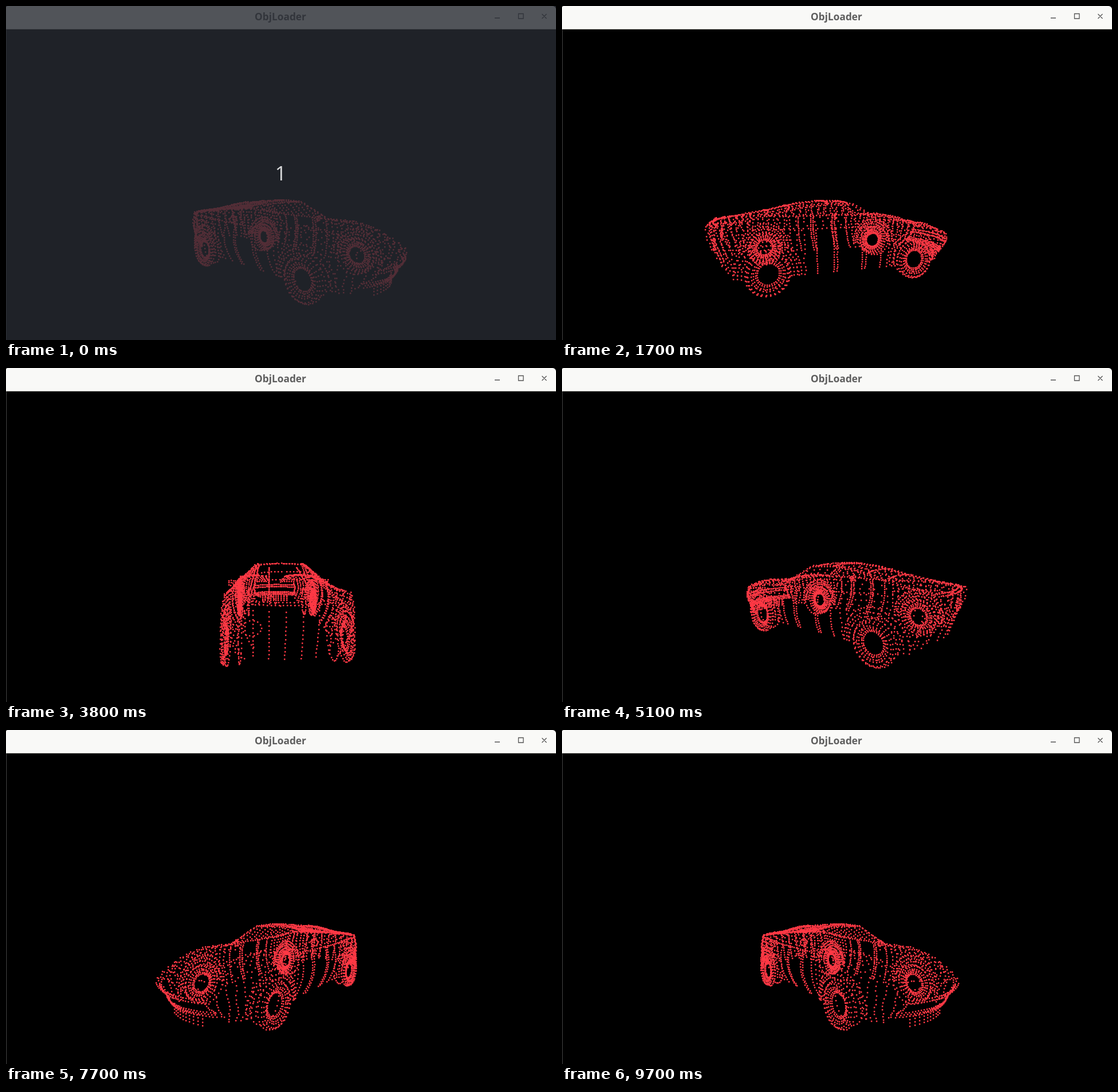
Recreate the animation shown at these times as an HTML page with a canvas. Size 960 by 584 pixels, loop 9900 ms.

```html
<!DOCTYPE html>
<html lang="en">
<head>
<meta charset="utf-8">
<title>ObjLoader</title>
<style>
html, body { margin: 0; width: 100%; height: 100%; overflow: hidden; background: #000; }
canvas { display: block; }
</style>
</head>
<body>
<canvas id="stage" width="960" height="584"></canvas>
<script>
const ctx = document.getElementById('stage').getContext('2d');
const LOOP = 9900, STEP = 100;
const HORIZON = 312, FOCAL = 447, DISTANCE = 467;
const HUB_Y = 124.6, AXLES = [111, -123], DOT = 2.5;

// Heading of the car in degrees over seconds.
const HEADING = [[0, -42], [1.7, 17.7], [3.8, 94.4], [5.1, 142], [6.7, 196.6], [7.7, 232], [9.7, 307]];
// Profiles along the car: u is forward, values are distances from the eye line or centre line.
const WIDTH = [[-212, 42], [-195, 64], [-150, 84], [-60, 83], [50, 82], [111, 85], [160, 76], [195, 58], [210, 42]];
const DECK = [[-212, 61], [-150, 58], [-60, 64], [65, 65], [111, 66], [150, 73], [190, 88], [210, 99]];
const BELLY = [[-212, 100], [-195, 126], [-150, 133], [111, 135], [180, 134], [210, 118]];
const ROOF = [[-195, 57], [-130, 47], [-70, 34], [-25, 30], [15, 32], [65, 64]];
const ROOF_HALF = [[-195, 52], [-110, 46], [-40, 42], [15, 46], [65, 66]];
// How far the lower edge is drawn in under the tail and the nose.
const TUCK = [[-212, 22], [-150, 5], [130, 5], [210, -26]];

function along(table, x) {
  let i = 1;
  while (i < table.length - 1 && x > table[i][0]) i++;
  const [x0, y0] = table[i - 1], [x1, y1] = table[i];
  const k = Math.min(1, Math.max(0, (x - x0) / (x1 - x0)));
  return y0 + (y1 - y0) * k;
}

let seed = 7;
function jitter(size) {
  seed = (seed * 16807) % 2147483647;
  return (seed / 2147483647 - 0.5) * size;
}

const points = [];
const add = (u, v, y) => points.push([u, v, y]);
const mirrored = (u, v, y) => { add(u, v, y); add(u, -v, y); };
const inWheel = (u, y, r) => AXLES.some(a => Math.hypot(u - a, y - HUB_Y) < r);

function ring(u, v, r, count) {
  for (let i = 0; i < count; i++) {
    const a = i / count * Math.PI * 2;
    mirrored(u + r * Math.cos(a), v, HUB_Y + r * Math.sin(a));
  }
}

function buildWheel(u) {
  ring(u, 79, 15, 30);
  ring(u, 80, 17, 30);
  ring(u, 82, 20, 30);
  ring(u, 83, 22.5, 30);
  ring(u, 84, 27, 30);
  ring(u, 82, 29, 30);
  ring(u, 78, 31, 30);
  ring(u, 62, 29, 26);
}

function buildArch(u) {
  for (const r of [35, 40, 46]) {
    const count = Math.round(r * 0.62);
    for (let i = 0; i <= count; i++) {
      const a = Math.PI * (0.97 + 1.06 * i / count);
      const pu = u + r * Math.cos(a), y = HUB_Y + r * Math.sin(a);
      mirrored(pu, along(WIDTH, pu) * (1 - (r - 35) * 0.004), Math.max(y, along(DECK, pu) + 2));
    }
  }
}

function sideColumn(u, count, wobble) {
  const top = along(DECK, u) + 3, bottom = along(BELLY, u), w = along(WIDTH, u), tuck = along(TUCK, u);
  for (let i = 0; i <= count; i++) {
    const t = i / count, y = top + (bottom - top) * t;
    const pu = u + tuck * t * t + jitter(wobble);
    if (!inWheel(pu, y, 34)) mirrored(pu, w * (1 - 0.4 * (t - 0.35) ** 2), y);
  }
}

function deckRow(u, count) {
  const w = along(WIDTH, u) * 0.94, y = along(DECK, u);
  for (let i = 0; i <= count; i++) {
    const t = i / count;
    mirrored(u + jitter(4), w * (0.3 + 0.7 * t), y - 3 * Math.sin(t * Math.PI) + jitter(2));
  }
}

function buildBody() {
  for (let u = -205; u <= -70; u += 10) sideColumn(u, 10, 4);
  for (const u of [-56, -30, -25, 16, 22, 48]) sideColumn(u, 16, 0.6);
  for (let u = 60; u <= 208; u += 10) sideColumn(u, 10, 4);
  for (let u = 78; u <= 206; u += 11) deckRow(u, 6);
  for (let u = -205; u <= -150; u += 11) deckRow(u, 6);
  // belt line
  for (let u = -130; u <= 60; u += 7) mirrored(u, 79, along(DECK, u) + 1);
}

function buildCabin() {
  for (let u = -190; u <= 62; u += 6) {
    const y = along(ROOF, u), w = along(ROOF_HALF, u);
    mirrored(u, w, y + 3);
    mirrored(u + 3, w * 0.9, y + 0.8);
    if (u < -60) mirrored(u, w * 0.5, y);
  }
  for (let u = -176; u <= 56; u += 13) {
    const y0 = along(ROOF, u) + 3, y1 = along(DECK, u) + 2, w = along(ROOF_HALF, u);
    const count = Math.max(2, Math.round((y1 - y0) / 5));
    for (let i = 1; i < count; i++) {
      const t = i / count;
      mirrored(u + 4 * t + jitter(5), w + (79 - w) * t, y0 + (y1 - y0) * t);
    }
  }
  for (const u of [-120, -86, -22, 14]) {
    for (let v = 4; v < 44; v += 5) mirrored(u - v * v / 260, v, along(ROOF, u) + v * v / 900);
  }
}

function buildEnds() {
  for (let v = 9; v <= 60; v += 17) {
    for (let y = 67; y <= 124; y += 5) mirrored(-208 + v * v / 160 + Math.max(0, y - 80) * 0.4, v, y);
  }
  for (let v = 0; v <= 54; v += 4) {
    mirrored(-208 + v * v / 250, v, 60);
    mirrored(-203 + v * v / 250, v, 58);
    const nose = 210 - (v / 14) ** 2;
    for (const y of [101, 106, 118, 121, 124]) mirrored(nose - (y - 101) * 0.6, v, y);
  }
  for (let v = 3; v <= 37; v += 7) {
    for (let y = 126; y <= 141; y += 4) mirrored(191 - v * v / 200, v, y);
  }
  // tail lamps
  for (let i = 0; i < 14; i++) {
    const a = i / 14 * Math.PI * 2;
    mirrored(-196, 44 + 10 * Math.cos(a), 86 + 8 * Math.sin(a));
  }
  // door mirrors
  for (let i = 0; i < 12; i++) mirrored(24 + jitter(8), 83 + (i % 4) * 4, 65 + Math.floor(i / 4) * 4);
}

AXLES.forEach(buildWheel);
AXLES.forEach(buildArch);
buildBody();
buildCabin();
buildEnds();

function drawCar(seconds) {
  const a = along(HEADING, seconds) * Math.PI / 180, c = Math.cos(a), s = Math.sin(a);
  ctx.fillStyle = '#ff3844';
  for (const [u, v, y] of points) {
    const scale = FOCAL / (DISTANCE + u * s - v * c);
    const x = 480 + (u * c + v * s - 1.7) * scale;
    ctx.fillRect(Math.round(x - DOT / 2), Math.round(HORIZON + y * scale - DOT / 2), DOT, DOT);
  }
}

function label(text, font, color, x, y) {
  ctx.font = font;
  ctx.fillStyle = color;
  ctx.textAlign = 'center';
  ctx.fillText(text, x, y);
}

function drawWindow() {
  ctx.fillStyle = '#000';
  ctx.fillRect(0, 0, 960, 584);
  ctx.fillStyle = '#f9f9f7';
  ctx.beginPath();
  ctx.roundRect(0, 0, 960, 41, [3, 6, 0, 0]);
  ctx.fill();
  ctx.fillStyle = '#b4b4b0';
  ctx.fillRect(0, 40, 960, 1);
  ctx.fillStyle = '#444';
  ctx.fillRect(0, 41, 1, 543);
  label('ObjLoader', 'bold 17.3px "Open Sans", sans-serif', '#5e5e5e', 479, 25);
  ctx.strokeStyle = '#555';
  ctx.lineWidth = 1.3;
  ctx.beginPath();
  ctx.moveTo(853, 21); ctx.lineTo(862, 21);
  ctx.rect(894.5, 13.5, 8.5, 8.5);
  ctx.moveTo(935.5, 14); ctx.lineTo(943.5, 22);
  ctx.moveTo(943.5, 14); ctx.lineTo(935.5, 22);
  ctx.stroke();
}

function drawCountdown() {
  ctx.fillStyle = 'rgba(39, 43, 50, 0.8)';
  ctx.fillRect(0, 0, 960, 584);
  label('1', '35px "Open Sans", sans-serif', '#d8d9da', 479.5, 305);
}

function frame() {
  const now = performance.now() % LOOP;
  const time = Math.min(LOOP - 2 * STEP, Math.floor(now / STEP) * STEP);
  drawWindow();
  drawCar(time / 1000);
  if (time < STEP) drawCountdown();
  requestAnimationFrame(frame);
}
frame();
</script>
</body>
</html>
```
